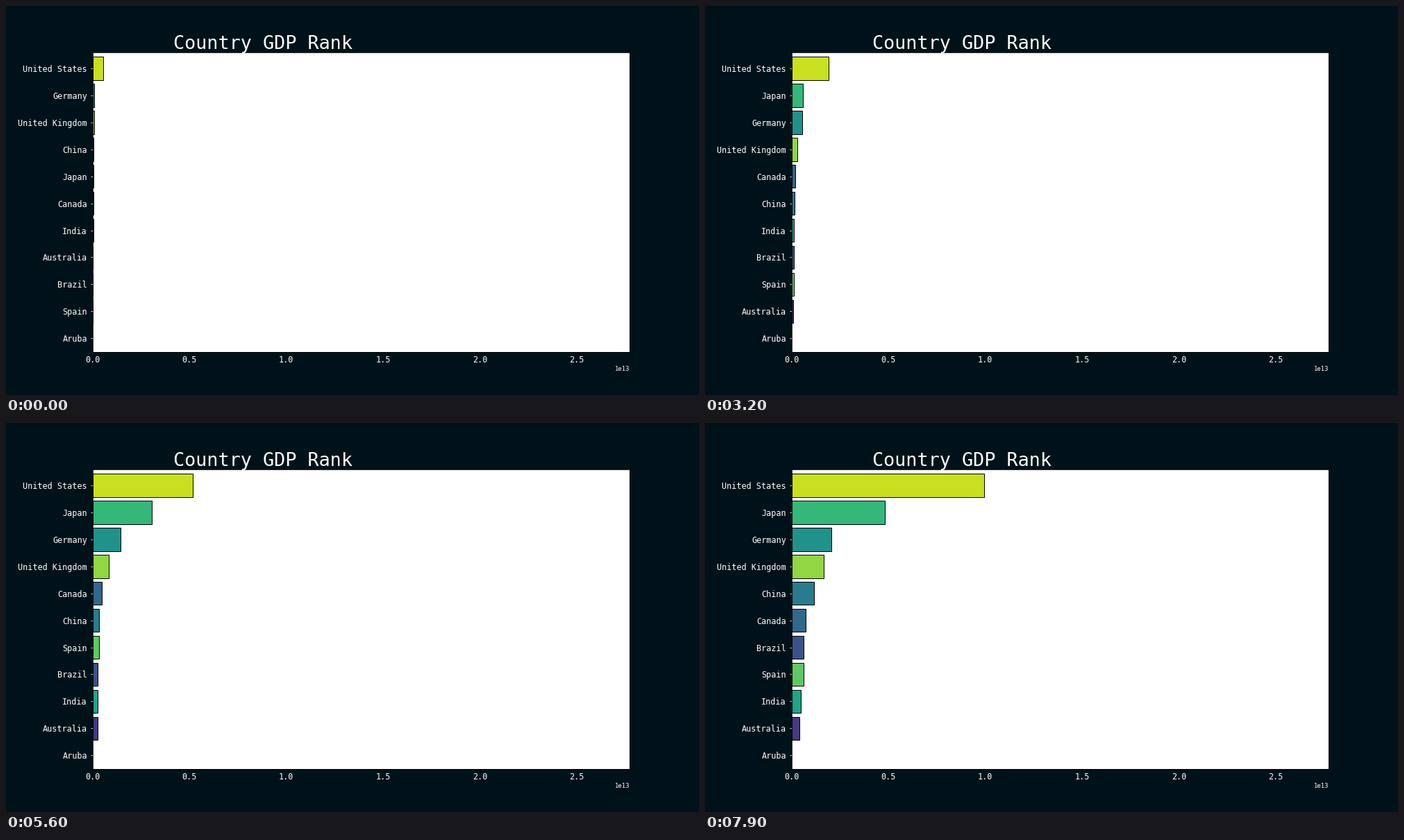
Animation of 998 by 561 pixels, one loop 8000 ms. Source, as a matplotlib script:

```python
import matplotlib.pyplot as plt
import numpy as np
from matplotlib.animation import FuncAnimation

W, H, DPI = 998, 561, 64
PX = 72 / DPI  # points per pixel
FRAMES, INTERVAL = 80, 100
LEFT, BOTTOM, WIDTH, HEIGHT = 0.125, 0.11, 0.775, 0.77
BG = "#001219"
MONO = "DejaVu Sans Mono"

# GDP in billions at a few years; steady growth in between.
KEYS = [1960, 1965, 1971.5, 1980, 1985, 1991, 1999.5]
GDP = {
    "Australia": [18.6, 26, 48.6, 150, 180.5, 326, 403],
    "Brazil": [15.2, 21.8, 52.7, 237, 223, 343, 627],
    "Canada": [40.5, 54, 106.2, 274, 365, 610, 711],
    "China": [60, 70, 106.8, 191, 309, 383, 1153],
    "Germany": [84, 134, 275, 950, 732, 1842, 2069],
    "India": [37, 60, 69.5, 186, 232, 270, 464],
    "Japan": [44, 91, 285, 1129, 1427, 3575, 4802],
    "Spain": [12, 24.7, 53, 233, 180.8, 576, 615],
    "United Kingdom": [73, 102, 159, 565, 489, 1143, 1675],
    "United States": [543, 744, 1222, 2857, 4339, 6158, 9942],
}
# How far a weak dollar lifts a country in two waves from 1985 to 1998.
LIFT = {"Japan": 0.36, "Germany": 0.26, "United Kingdom": 0.1}

years = 1960 + np.arange(FRAMES) / 2
wave = np.sin(np.pi * (years - 1985) / 6.5) ** 2
wave[(years < 1985) | (years > 1998)] = 0

names = list(GDP)
N = len(names) + 1  # the lowest row stays empty
values = 1e9 * np.array([
    np.exp(np.interp(years, KEYS, np.log(GDP[n]))) * (1 + LIFT.get(n, 0) * wave)
    for n in names])
ranks = values.argsort(axis=0).argsort(axis=0) + 2

fig = plt.figure(figsize=(W / DPI, H / DPI), dpi=DPI, facecolor=BG)
ax = fig.add_axes([LEFT, BOTTOM, WIDTH, HEIGHT], facecolor="white")
LOW, SPAN = 0.485, N + 0.1
ax.set(xlim=(0, 2.772e13), ylim=(LOW, LOW + SPAN), xticks=[])
ax.set_yticks(range(1, N + 1), [""] * N)
ax.tick_params(axis="y", color="white", length=3.5 * PX, width=0.8 * PX)
for spine in ax.spines.values():
    spine.set_linewidth(0.8 * PX)


def label(x, y, text, size, ha):
    """Write white text with its baseline at pixel (x, y) from the top left."""
    return fig.text(x / W, 1 - y / H, text, size=size * PX, family=MONO,
                    color="white", ha=ha, va="baseline")


def base_y(rank):
    """Baseline of a row's name, in pixels from the top."""
    return H * (1 - BOTTOM - HEIGHT * (rank - LOW) / SPAN) + 5


label(370, 62, "Country GDP Rank", 26.8, "center")
label(898, 526, "1e13", 8.9, "right")
label(117, base_y(1), "Aruba", 11.76, "right")
for i in range(6):
    label(124.75 + 139.5 * i, 513.5, f"{i / 2:.1f}", 11.7, "center")

colors = plt.get_cmap("viridis")(np.arange(2, N + 1) / (N + 1))
bars = ax.barh(ranks[:, 0], values[:, 0], height=0.86, color=colors,
               edgecolor="black", linewidth=PX)
tags = [label(117, 0, name, 11.76, "right") for name in names]


def update(k):
    for bar, tag, value, rank in zip(bars, tags, values[:, k], ranks[:, k]):
        bar.set_width(value)
        bar.set_y(rank - 0.43)
        tag.set_y(1 - base_y(rank) / H)
    return [*bars, *tags]


anim = FuncAnimation(fig, update, frames=FRAMES, interval=INTERVAL,
                     init_func=lambda: update(0), repeat=True, repeat_delay=0)
plt.show()
```
